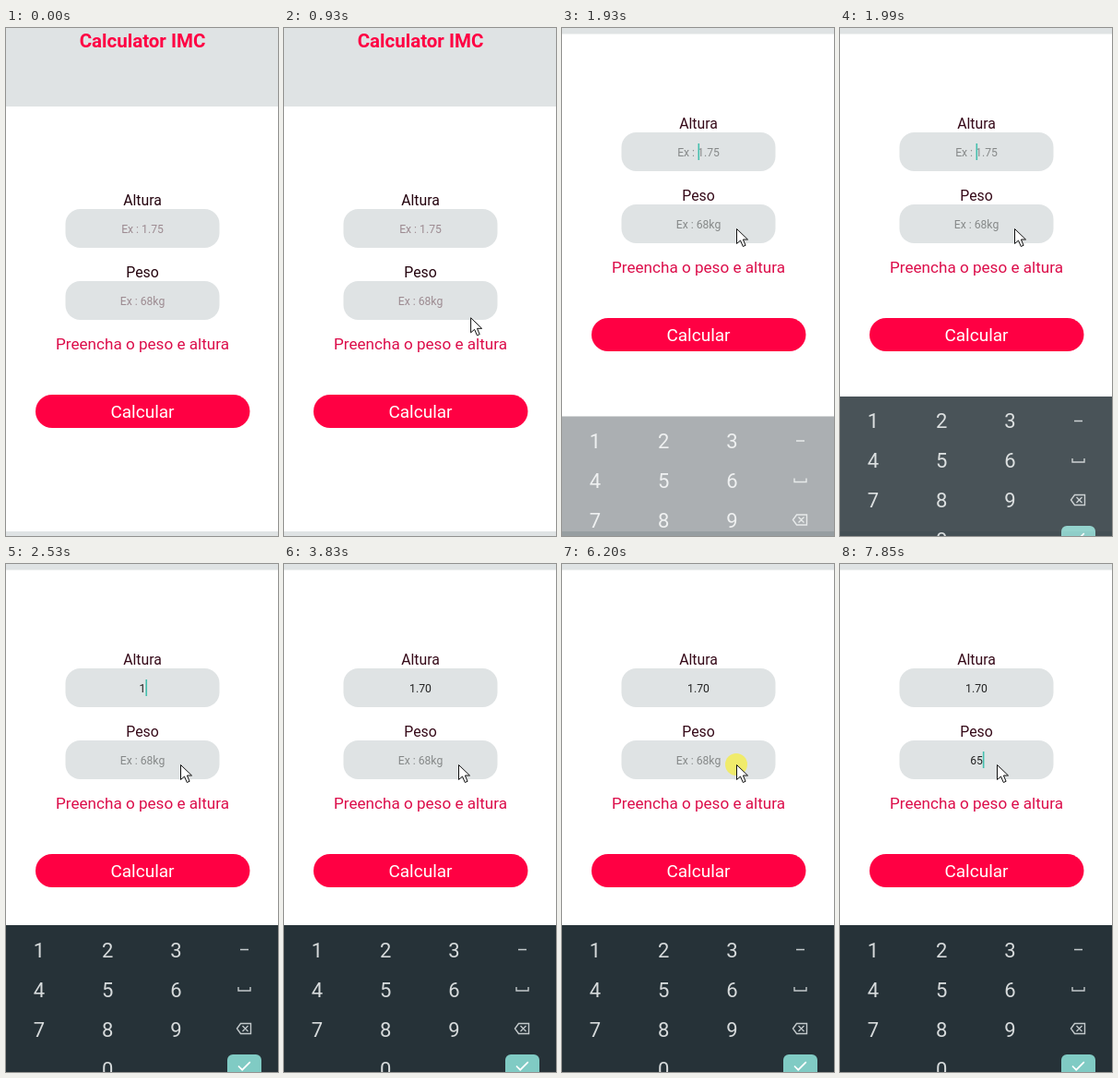
Recreate the animation shown at these times as an HTML page. Size 295 by 550 pixels, loop 8 s.

```html
<!DOCTYPE html>
<html lang="pt">
<head>
<meta charset="utf-8">
<title>Calculator IMC</title>
<style>
  html, body { margin: 0; width: 100%; height: 100%; overflow: hidden; background: #fff; }
  svg { display: block; width: 295px; height: 550px; font-family: Roboto, sans-serif; text-anchor: middle; }
  .grey { fill: #dfe3e4; }
  .red { fill: #ff0043; }
  .label { font-size: 15.8px; fill: #25040f; }
  .value { font-size: 12.2px; fill: #222; }
  .value.hint { fill: #9d8b91; }
  .open .label { fill: #360a19; }
  .open .value.hint { fill: #868989; }
  #keys text { font-size: 22px; fill: #d6dadb; }
  .icon { fill: none; stroke: #c3c9cb; stroke-width: 1.4; }
</style>
</head>
<body>
<svg id="app" viewBox="0 0 295 550">
  <g id="header">
    <rect class="grey" width="295" height="85"/>
    <text class="red" x="148" y="21" font-size="20.5" font-weight="700">Calculator IMC</text>
  </g>
  <rect class="grey" y="545" width="295" height="5"/>
  <g id="form">
    <text class="label" x="148" y="192">Altura</text>
    <rect class="grey" x="64.5" y="196" width="167" height="42" rx="16"/>
    <text class="value" id="height" x="148" y="221.5"></text>
    <text class="label" x="148" y="269.7">Peso</text>
    <rect class="grey" x="64.5" y="274" width="167" height="42" rx="16"/>
    <text class="value" id="weight" x="148" y="300"></text>
    <rect id="caret" width="1.6" height="18" fill="#45bfae"/>
    <text x="148" y="348" font-size="17.1" fill="#dc0d4a">Preencha o peso e altura</text>
    <rect class="red" x="32" y="397" width="232.5" height="36" rx="18"/>
    <text x="148" y="422" font-size="19" fill="#fff">Calcular</text>
  </g>
  <g id="keyboard">
    <rect y="391" width="295" height="160" fill="#263238"/>
    <g id="keys"></g>
    <path class="icon" d="M254 417.5h9M252 458v4h13v-4"/>
    <path class="icon" d="M250.5 503l4-5.5h11v11h-11zM256.5 500l6 6m0-6l-6 6"/>
    <rect x="240" y="531" width="37" height="30" rx="6" fill="#80cbc4"/>
    <path d="M252 543.5l4.2 4.2 8.6-8.6" fill="none" stroke="#fff" stroke-width="1.7"/>
  </g>
  <circle id="tap" r="12" fill="#f1ec62" fill-opacity=".93"/>
  <path id="cursor" d="M0 0V16L4 12.5 6.8 19 9.6 17.8 6.9 11.5H12Z" fill="#fff" stroke="#111" stroke-linejoin="round"/>
</svg>
<script>
const LOOP = 8000;
const el = id => document.getElementById(id);
const clamp = v => Math.min(1, Math.max(0, v));
const within = (t, spans) => spans.some(([a, b]) => t >= a && t < b);
const snap = (t, start, step) => start + Math.floor((t - start) / step) * step;
const show = (node, on) => node.setAttribute('visibility', on ? 'visible' : 'hidden');
const move = (node, x, y) => node.setAttribute('transform', `translate(${x} ${y})`);
const latest = (t, steps) => steps.filter(s => t >= s[0]).pop()[1];

const heightText = [[0, ''], [2530, '1'], [2680, '1.'], [3090, '1.7'], [3220, '1.70']];
const weightText = [[0, ''], [7510, '6'], [7780, '65']];
const heightCaret = [[1790, 2330], [2530, 3830], [4300, 4790], [5330, 5800], [6330, 6460]];
const weightCaret = [[6530, 7030], [7510, LOOP]];
const taps = [[1400, 1660], [6200, 6460]];

['123', '456', '789', ' 0'].forEach((row, r) => [...row].forEach((digit, c) => {
  const key = document.createElementNS('http://www.w3.org/2000/svg', 'text');
  key.setAttribute('x', 36 + c * 74.2);
  key.setAttribute('y', 425.5 + r * 43);
  key.textContent = digit;
  el('keys').append(key);
}));

function setField(id, value, hint) {
  el(id).textContent = value || hint;
  el(id).classList.toggle('hint', !value);
}

function cursorAt(t) {
  if (t >= 6860) return [189 - 19 * clamp((snap(t, 6860, 86) - 6774) / 344), 217];
  const k = clamp((snap(t, 650, 68) - 650) / 408);
  const bend = (a, b, c) => (1 - k) ** 2 * a + 2 * k * (1 - k) * b + k * k * c;
  return [bend(235, 207, 189), bend(472, 370, 217)];
}

function draw(t) {
  const open = t >= 1930;
  el('app').classList.toggle('open', open);
  move(el('header'), 0, open ? -78.5 : 0);
  move(el('form'), 0, open ? -83 : 0);

  const left = (1 - clamp((snap(t, 1930, 60) - 1900) / 200)) ** 3;
  show(el('keyboard'), open);
  move(el('keyboard'), 0, 48 * left);
  el('keyboard').setAttribute('opacity', 1 - left);

  const height = latest(t, heightText), weight = latest(t, weightText);
  setField('height', height, 'Ex : 1.75');
  setField('weight', weight, 'Ex : 68kg');

  const onWeight = t >= 6460;
  const typed = onWeight ? weight : height;
  const half = typed ? el(onWeight ? 'weight' : 'height').getComputedTextLength() / 2 : -0.5;
  show(el('caret'), within(t, onWeight ? weightCaret : heightCaret));
  move(el('caret'), 148 + half, onWeight ? 286 : 208);

  const [x, y] = cursorAt(t);
  show(el('cursor'), t >= 650);
  move(el('cursor'), x + 0.5, y + 0.5);
  show(el('tap'), within(t, taps));
  move(el('tap'), 189, 217);
}

const begin = performance.now();
function tick() {
  draw((performance.now() - begin) % LOOP);
  requestAnimationFrame(tick);
}
tick();
</script>
</body>
</html>
```
